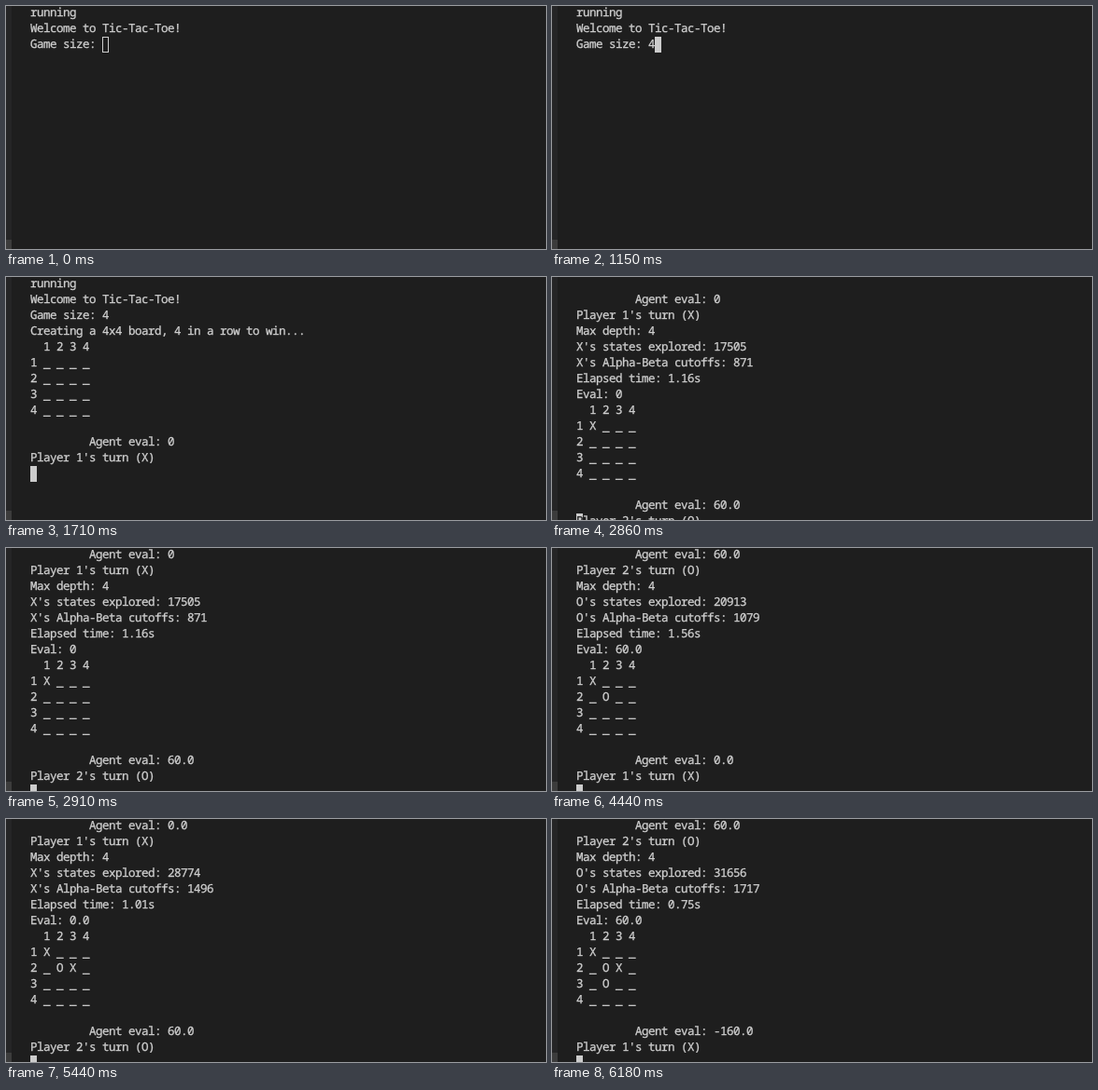
Recreate the animation shown at these times as an HTML page. Size 578 px wide and 261 px high, loop 8 s.

```html
<!DOCTYPE html>
<html lang="en">
<head>
<meta charset="utf-8">
<title>Tic-Tac-Toe in a terminal</title>
<style>
  html, body { margin: 0; width: 100%; height: 100%; overflow: hidden; background: #1e1e1e; }
  svg { display: block; }
  text {
    font: 12.5px "Noto Sans Mono", monospace;
    letter-spacing: -0.5px;
    white-space: pre;
    text-rendering: geometricPrecision;
    fill: #d0d0d0;
    stroke: #d0d0d0;
    stroke-width: 0.3px;
  }
  .covered { fill: #1e1e1e; stroke: #1e1e1e; }
</style>
</head>
<body>
<svg id="stage" width="578" height="261" viewBox="0 0 578 261">
  <rect width="578" height="261" fill="#1e1e1e"/>
  <rect width="6" height="261" fill="#252526"/>
  <rect y="251" width="6" height="10" fill="#3c3c3c"/>
</svg>
<script>
const LOOP = 8000, ROWS = 16, CELL_W = 7, CELL_H = 17, LEFT = 26, TOP = -1, BASE = 12;
const stage = document.getElementById("stage");

function add(tag, attrs) {
  const el = document.createElementNS("http://www.w3.org/2000/svg", tag);
  for (const key in attrs) el.setAttribute(key, attrs[key]);
  return stage.appendChild(el);
}

function board(cells) {
  const rows = [0, 1, 2, 3].map(r => `${r + 1} ${[...cells.slice(r * 4, r * 4 + 4)].join(" ")}`);
  return ["  1 2 3 4", ...rows, ""];
}

function prompt(score, player) {
  return [" ".repeat(9) + "Agent eval: " + score, `Player ${player}'s turn (${"XO"[player - 1]})`];
}

function turn(mark, states, cutoffs, secs, before, cells, after) {
  return [
    "Max depth: 4",
    `${mark}'s states explored: ${states}`,
    `${mark}'s Alpha-Beta cutoffs: ${cutoffs}`,
    `Elapsed time: ${secs}s`,
    `Eval: ${before}`,
    ...board(cells),
    ...prompt(after, mark === "X" ? 2 : 1)
  ];
}

const log = [
  "running",
  "Welcome to Tic-Tac-Toe!",
  "Game size: 4",
  "Creating a 4x4 board, 4 in a row to win...",
  ...board("________________"),
  ...prompt("0", 1),
  ...turn("X", 17505, 871, "1.16", "0", "X_______________", "60.0"),
  ...turn("O", 20913, 1079, "1.56", "60.0", "X____O__________", "0.0"),
  ...turn("X", 28774, 1496, "1.01", "0.0", "X____OX_________", "60.0"),
  ...turn("O", 31656, 1717, "0.75", "60.0", "X____OX__O______", "-160.0")
];

// at: start time, top: first visible line, line/col: cursor cell
const views = [
  { at: 0, top: 0, line: 2, col: 11, typing: true, hollow: true },
  { at: 410, top: 0, line: 2, col: 11, typing: true },
  { at: 1150, top: 0, line: 2, col: 12, typing: true },
  { at: 1710, top: 0, line: 12, col: 0 },
  { at: 2860, top: 9, line: 24, col: 0, under: true },
  { at: 2910, top: 10, line: 25, col: 0 },
  { at: 4440, top: 23, line: 38, col: 0 },
  { at: 5440, top: 36, line: 51, col: 0 },
  { at: 6180, top: 49, line: 64, col: 0 }
];

// Underscores sit one pixel lower than the font puts them.
const layer = drop => Array.from({ length: ROWS }, (_, i) =>
  add("text", { x: LEFT, y: TOP + BASE + drop + i * CELL_H }));
const letters = layer(0), blanks = layer(1);
const cursor = add("rect", { stroke: "#ccc", width: CELL_W - 1, height: CELL_H - 1 });
const covered = add("text", { class: "covered" });

function lineText(view, n) {
  if (n > view.line || (n === view.line && !view.typing && !view.under)) return "";
  const text = log[n] || "";
  return n === view.line && view.typing ? text.slice(0, view.col) : text;
}

let shown;
function draw(ms) {
  const view = views.filter(v => v.at <= ms).pop();
  if (view === shown) return;
  shown = view;
  for (let i = 0; i < ROWS; i++) {
    const text = lineText(view, view.top + i);
    letters[i].textContent = text.replace(/_/g, " ");
    blanks[i].textContent = text.replace(/[^_]/g, " ");
  }
  const x = LEFT + view.col * CELL_W, y = TOP + (view.line - view.top) * CELL_H;
  cursor.setAttribute("x", x + 0.5);
  cursor.setAttribute("y", y + 0.5);
  cursor.setAttribute("fill", view.hollow ? "none" : "#ccc");
  covered.setAttribute("x", x);
  covered.setAttribute("y", y + BASE);
  covered.textContent = view.under ? log[view.line][view.col] : "";
}

const start = performance.now();
function tick() {
  draw((performance.now() - start) % LOOP);
  requestAnimationFrame(tick);
}
tick();
</script>
</body>
</html>
```
